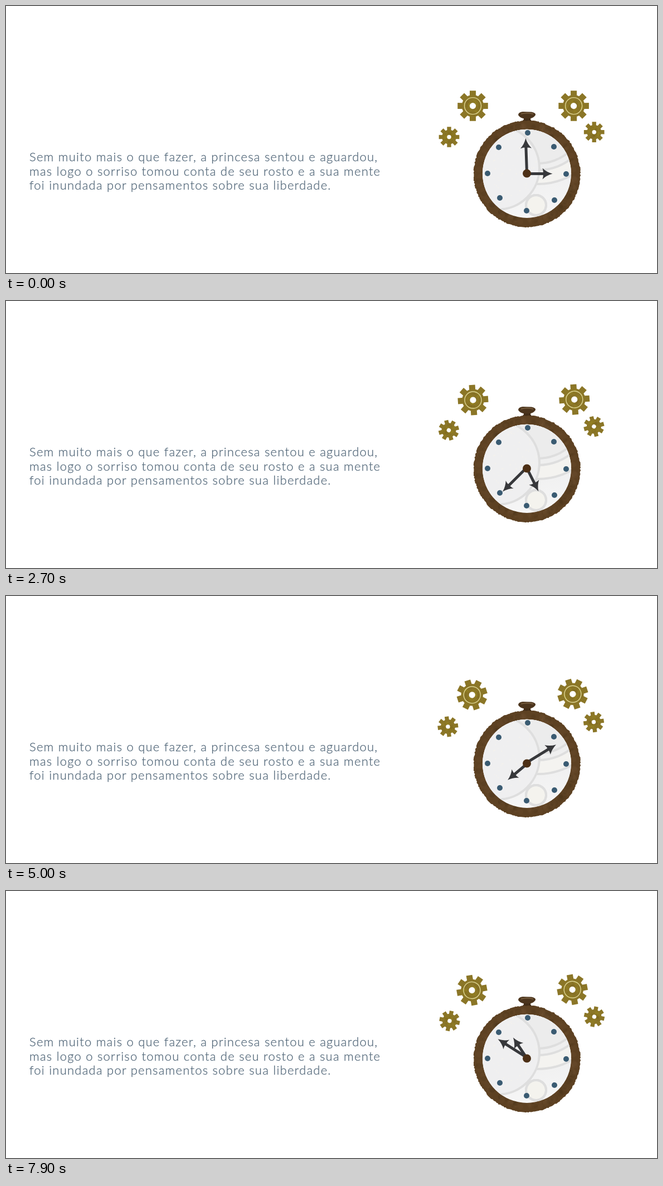
Animation of 1168 by 480 pixels, one loop 8000 ms. Source, as an HTML page:

```html
<!DOCTYPE html>
<html lang="pt">
<head>
<meta charset="utf-8">
<style>
  html, body { margin: 0; width: 100%; height: 100%; overflow: hidden; background: #fff; }
  svg { display: block; width: 1168px; height: 480px; }
  text {
    font: 300 22px Lato, sans-serif; letter-spacing: 1.24px;
    fill: #526779; stroke: #526779; stroke-width: .3px;
  }
</style>
</head>
<body>
<svg viewBox="0 0 1168 480">
  <defs>
    <clipPath id="dial"><circle cx="934.500" cy="301.300" r="79.600"/></clipPath>
    <linearGradient id="glass" x2="0" y2="1">
      <stop stop-color="#e9e9ea"/><stop offset="1" stop-color="#f6f6f6"/>
    </linearGradient>
    <path id="head" stroke="none" d="M0 0Q3 11 10 18Q4 16 0 17Q-4 16 -10 18Q-3 11 0 0Z"/>
  </defs>

  <text x="42" y="279">Sem muito mais o que fazer, a princesa sentou e aguardou,</text>
  <text x="42" y="304.500">mas logo o sorriso tomou conta de seu rosto e a sua mente</text>
  <text x="42" y="330">foi inundada por pensamentos sobre sua liberdade.</text>

  <g id="gears"></g>

  <path d="M928 199H942L941 204L945 209H924L929 204Z" fill="#432d17"/>
  <path d="M919 196Q919 191 927 190L943 190.500Q951 192 950 196Q947 201 941 202L928 202Q922 201 919 196Z" fill="#4b341c"/>
  <path d="M924 194Q934 191 946 194" fill="none" stroke="#755c3e" stroke-width="2"/>
  <g id="rim"></g>

  <g clip-path="url(#dial)">
    <circle cx="934.500" cy="301.300" r="80" fill="url(#glass)"/>
    <g stroke="#dedede" stroke-width="4" fill="none">
      <circle cx="955" cy="200" r="120" fill="#f4f3f0"/>
      <circle cx="955" cy="200" r="95" fill="#efefef"/>
      <circle cx="955" cy="200" r="83" fill="#ececec"/>
      <circle cx="951" cy="358" r="18" fill="#f4f3ee"/>
      <circle cx="882" cy="291" r="75" fill="#efeff0"/>
      <circle cx="951" cy="358" r="18"/>
    </g>
    <g id="specks"></g>
  </g>
  <g id="marks"></g>

  <g fill="#37383b" stroke="#37383b" stroke-linecap="round">
    <g id="hour"><path d="M0 0V-32" stroke-width="5"/><use href="#head" y="-45.500"/></g>
    <g id="minute"><path d="M0 0V-47" stroke-width="5"/><use href="#head" y="-61.500"/></g>
  </g>
  <circle cx="934.500" cy="301" r="7.500" fill="#4d3016"/>
</svg>

<script>
const $ = id => document.getElementById(id);

let seed = 7;
const random = (lo = 0, hi = 1) => {
  seed = (seed * 16807) % 2147483647;
  return lo + (hi - lo) * seed / 2147483647;
};

function add(parent, tag, attrs) {
  const el = document.createElementNS('http://www.w3.org/2000/svg', tag);
  for (const name in attrs) el.setAttribute(name, attrs[name]);
  return parent.appendChild(el);
}

const polar = (r, a) => [r * Math.cos(a), r * Math.sin(a)];
const dot = (parent, cx, cy, r, fill, opacity = 1) =>
  add(parent, 'circle', { cx, cy, r, fill, opacity });

// Rough painted rim
const edge = Array.from({ length: 260 }, (_, i) =>
  polar(95.9 + random(-1, 0.8), i / 260 * 2 * Math.PI));
const rim = $('rim');
rim.setAttribute('transform', 'translate(934.7 301.8)');
add(rim, 'polygon', { points: edge.join(' '), fill: '#5d4122' });
for (let i = 0; i < 110; i++) {
  const [x, y] = polar(random(80, 88), random(0, 2 * Math.PI));
  const dark = random() < 0.35 + (x < 0 ? 0.2 : 0);
  dot(rim, x, y, random(3, 7), dark ? '#38260e' : '#78593a', 0.13);
}

// Dial speckles and hour marks
for (let i = 0; i < 170; i++) {
  const [x, y] = polar(72 * Math.sqrt(random()), random(0, 2 * Math.PI));
  dot($('specks'), 882 + x, 291 + y, random(0.4, 1), '#f8f4ea', 0.8);
}
[[936, 228], [983, 253], [1005, 302], [984, 349], [934, 368], [886, 345], [864, 301], [884, 254]]
  .forEach(([x, y]) => dot($('marks'), x, y, 5, '#3a5b72'));

// Each gear turns about a pivot slightly off its own centre
function makeGear(pivotX, pivotY, dx, dy, big) {
  const outer = big ? 27.8 : 18.7, root = big ? 19.8 : 13;
  const points = [];
  for (let i = 0; i < 8; i++) {
    const a = i * Math.PI / 4;
    points.push(polar(root, a - 0.28), polar(outer, a - 0.2),
                polar(outer, a + 0.2), polar(root, a + 0.28));
  }
  const pivot = add($('gears'), 'g', {});
  const body = add(pivot, 'g', { transform: `translate(${dx} ${dy})` });
  add(body, 'polygon', { points: points.join(' '), fill: '#8b7627' });
  for (let i = 0; i < 22; i++) {
    const [x, y] = polar(random(4, root - 3), random(0, 2 * Math.PI));
    dot(body, x, y, random(1.5, 4), i % 2 ? '#a08c20' : '#75611f', 0.22);
  }
  if (big) add(body, 'circle', { r: 15, fill: 'none', stroke: '#ded593', 'stroke-width': 1.4 });
  dot(body, 0, 0, big ? 5.6 : 3.7, '#fff');
  return angle => pivot.setAttribute('transform', `translate(${pivotX} ${pivotY}) rotate(${angle})`);
}

const bigGears = [makeGear(837, 178.6, 0.5, 1, true), makeGear(1018, 177.8, 0.6, 1.8, true)];
const smallGears = [makeGear(794.3, 234, 0.7, 1.5), makeGear(1054.9, 226.2, 0.3, 0.5)];

const turnHand = (id, x, y, angle) =>
  $(id).setAttribute('transform', `translate(${x} ${y}) rotate(${angle})`);

function draw(now) {
  const step = Math.floor(now % 8000 / 100);
  turnHand('minute', 934.5, 299.3, -2 + 8.41 * step);
  turnHand('hour', 935, 301.5, step < 10 ? 90 : 63.5 + 3.33 * step);
  bigGears.forEach(turn => turn(11.13 * Math.max(0, step - 3.1)));
  smallGears.forEach(turn => turn(-5.55 * step));
  requestAnimationFrame(draw);
}
draw(0);
</script>
</body>
</html>
```
